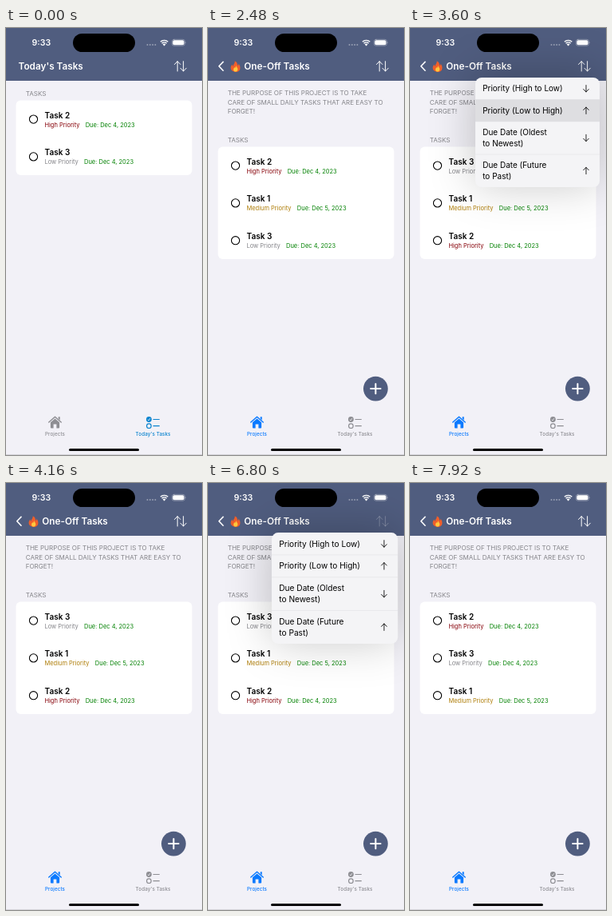
Write an HTML page that moves like this. It is 246 by 534 pixels and loops after 8 s.

```html
<!DOCTYPE html>
<html lang="en">
<head>
<meta charset="utf-8">
<title>Task list sorting</title>
<style>
  html, body { margin: 0; width: 100%; height: 100%; overflow: hidden; background: #f2f1f7; }
  svg { display: block; width: 100%; height: 100%; font-family: Inter, Roboto, sans-serif; }
  .line { fill: none; stroke: currentColor; stroke-linecap: round; stroke-linejoin: round; }
  .title { font-size: 11.75px; font-weight: 600; fill: #fff; }
  .head { font-size: 8.05px; fill: #85858a; }
  .task { font-size: 10px; font-weight: 600; }
  .sub { font-size: 7.5px; }
  .tab { font-size: 6.25px; font-weight: 500; letter-spacing: .1px; text-anchor: middle; fill: currentColor; }
  .item { font-size: 10px; }
  #panel { filter: drop-shadow(0 -4px 28px rgba(0, 0, 0, .23)); }
</style>
</head>
<body>
<svg viewBox="0 0 246 534">
  <rect width="246" height="534" fill="#f2f1f7"/>
  <rect width="246" height="66" fill="#505d7f"/>

  <!-- status bar -->
  <rect x="84" y="7" width="78" height="23" rx="11.5"/>
  <text x="32.6" y="22.4" font-size="10.6" font-weight="600" fill="#fff">9:33</text>
  <g fill="#fff">
    <g opacity=".4">
      <circle cx="177.5" cy="21" r="1"/><circle cx="180.8" cy="21" r="1"/>
      <circle cx="184.1" cy="21" r="1"/><circle cx="187.4" cy="21" r="1"/>
    </g>
    <path d="M198.6 22.4l-1.9-2a2.7 2.7 0 0 1 3.8 0z"/>
    <rect x="209.3" y="15.3" width="14.2" height="5.9" rx="1.8"/>
    <path d="M225.4 16.9q1.2 1.3 0 2.7z" opacity=".5"/>
  </g>
  <g class="line" color="#fff">
    <path d="M193.9 17.3a6.7 6.7 0 0 1 9.4 0M195.6 19.2a4.3 4.3 0 0 1 6 0" stroke-width="1.4" stroke-linecap="butt"/>
    <rect x="208.3" y="14.3" width="16.2" height="7.9" rx="2.6" stroke-width=".6" opacity=".5"/>
    <path id="sort" d="M215.2 54V41.7m-3.7 3.8l3.7-3.8 3.7 3.8M222.6 41.7V54m-3.7-3.8l3.7 3.8 3.7-3.8" stroke-width="1"/>
  </g>

  <g id="today">
    <text class="title" x="15.6" y="52">Today's Tasks</text>
    <text class="head" x="24.7" y="85">TASKS</text>
  </g>

  <g id="project">
    <path class="line" color="#fff" d="M19 42.4l-5.2 5.4 5.2 5.4" stroke-width="1.6"/>
    <path d="M33.6 41.2c3.4 1.6 3.3 4.2 3.8 5.8 1-.6 1-1.6 1-2.6 3.3 4.2 2.9 10.2-3.3 10.5-6.7.3-8.2-5.7-4.7-9.3q.1 1.7 1.1 2.3c.1-2.6 2.7-3.9 2.1-6.7z" fill="#f05f2b"/>
    <path d="M35 46.8c.3 2 2.6 3 2.3 5.4-.6 3.3-5.4 3-5.3-.2.1-1.5 1-1.8 1.2-2.9l.9.9q1-1.2.9-3.2z" fill="#ffc83d"/>
    <text class="title" x="45.3" y="52">One-Off Tasks</text>
    <g class="head">
      <text x="24.7" y="84.4">THE PURPOSE OF THIS PROJECT IS TO TAKE</text>
      <text x="24.7" y="95.7">CARE OF SMALL DAILY TASKS THAT ARE EASY TO</text>
      <text x="24.7" y="106.9">FORGET!</text>
      <text x="24.7" y="142.6">TASKS</text>
    </g>
    <circle cx="210.4" cy="451.1" r="15.4" fill="#505d7f"/>
    <path class="line" color="#fff" d="M204.2 451.1h12.4M210.4 444.9v12.4" stroke-width="2"/>
  </g>

  <!-- tab bar -->
  <g id="homeTab">
    <path class="line" d="M53.8 493l7.7-6.7 7.7 6.7" stroke-width="1.5"/>
    <path d="M65.7 486.2h2v4.2l-2-1.8zM55.9 493.3l5.6-4.9 5.6 4.9v6.3q0 1-1 1h-2.7v-5.1h-3.8v5.1h-2.7q-1 0-1-1z" fill="currentColor"/>
    <text class="tab" x="61.5" y="510">Projects</text>
  </g>
  <g id="todayTab">
    <circle cx="179.4" cy="489.5" r="3.4" fill="currentColor"/>
    <path d="M177.9 489.7l1.1 1.3 1.9-2.9" fill="none" stroke="#f2f1f7" stroke-width=".8"/>
    <g class="line" stroke-width="1.2">
      <circle cx="179.4" cy="497.7" r="2.8"/>
      <path d="M185 489.5h7.3M185 497.7h7.3"/>
    </g>
    <text class="tab" x="184.6" y="510">Today's Tasks</text>
  </g>
  <rect x="79" y="525.9" width="88" height="3.1" rx="1.55"/>
  <rect y="533.3" width="246" height=".7" fill="#c9c9ce"/>

  <g id="menu">
    <rect id="panel" x="82" y="62" width="156" height="137" rx="8" fill="#f4f4f6"/>
    <rect id="mark" x="82" width="156" fill="#dedee1"/>
  </g>
</svg>
<script>
const $ = id => document.getElementById(id);
const LOOP = 8000, MENU_X = 222, MENU_Y = 62;

const tasks = {
  1: ["Medium", "#ae7d08", 5],
  2: ["High", "#860008", 4],
  3: ["Low", "#85858a", 4]
};

function card(parent, top, order) {
  const rows = order.map((id, i) => {
    const [level, color, day] = tasks[id], y = top + i * 46.8;
    return `<circle cx="34.5" cy="${y + 23.6}" r="5.1" fill="none" stroke="#000" stroke-width="1.1"/>
      <text class="task" x="48.6" y="${y + 22}">Task ${id}</text>
      <text class="sub" x="48.4" y="${y + 33.1}" fill="${color}">${level} Priority<tspan dx="7.2" fill="#008000">Due: Dec ${day}, 2023</tspan></text>`;
  });
  parent.insertAdjacentHTML("beforeend",
    `<g><rect x="12.5" y="${top}" width="221" height="${order.length * 46.8}" rx="6" fill="#fff"/>${rows.join("")}</g>`);
  return parent.lastElementChild;
}

card($("today"), 90.5, [2, 3]);
const lists = [[2, 1, 3], [3, 1, 2], [2, 3, 1]].map(order => card($("project"), 148.5, order));

// Menu rows: top, height, arrow direction, lines
const items = [
  [62, 27.5, 1, "Priority (High to Low)"],
  [89.5, 27.5, -1, "Priority (Low to High)"],
  [117, 41, 1, "Due Date (Oldest", "to Newest)"],
  [158, 41, -1, "Due Date (Future", "to Past)"]
];
items.forEach(([top, height, dir, ...lines], i) => {
  const mid = top + height / 2;
  const text = lines.map((s, n) =>
    `<text class="item" x="91.2" y="${mid + 3.6 + (n - (lines.length - 1) / 2) * 13.4}">${s}</text>`);
  const rule = i ? `<path d="M82 ${top}h156" stroke="#dcdce0" stroke-width=".5"/>` : "";
  $("menu").insertAdjacentHTML("beforeend", rule + text.join("") +
    `<path class="line" d="M221 ${mid - 4.2 * dir}v${8.4 * dir}m-3.3 ${-3.4 * dir}l3.3 ${3.4 * dir} 3.3 ${-3.4 * dir}" stroke-width=".85"/>`);
});

// One visit to the menu: opening, choice, start of closing, chosen row
const visits = [
  { open: 2500, pick: 3600, close: 3985, row: 1 },
  { open: 6500, pick: 7440, close: 7670, row: 2 }
];
const CLOSING = 170;

function spring(ms) {
  const s = ms / 1000, w = 10.5, a = 13.6;
  return 1 - Math.exp(-a * s) * (Math.cos(w * s) + a / w * Math.sin(w * s));
}

const show = (el, on) => el.setAttribute("visibility", on ? "inherit" : "hidden");

function drawMenu(t) {
  const v = visits.find(v => t >= v.open && t < v.close + CLOSING);
  $("menu").style.display = v ? "" : "none";
  $("sort").setAttribute("opacity", v && t < v.pick ? .25 : 1);
  if (!v) return;
  const out = Math.max(0, (t - v.close) / CLOSING);
  const scale = (.15 + .85 * spring(t - v.open)) * (1 - .7 * out * out);
  const alpha = Math.min(1, (t - v.open) / 130) * (1 - out);
  $("menu").setAttribute("transform",
    `translate(${MENU_X} ${MENU_Y}) scale(${scale}) translate(${-MENU_X} ${-MENU_Y})`);
  $("menu").setAttribute("opacity", alpha);
  const [top, height] = items[v.row];
  $("mark").setAttribute("y", top);
  $("mark").setAttribute("height", height);
  show($("mark"), t >= v.pick);
}

function draw(t) {
  const inProject = t >= 800;
  show($("today"), !inProject);
  show($("project"), inProject);
  $("homeTab").style.color = inProject ? "#0a7aff" : "#8e8e93";
  $("todayTab").style.color = inProject ? "#8e8e93" : "#0b84cf";
  const sorted = visits.filter(v => t >= v.pick).length;
  lists.forEach((list, i) => show(list, i === sorted));
  drawMenu(t);
}

const start = performance.now();
function tick() {
  draw((performance.now() - start) % LOOP);
  requestAnimationFrame(tick);
}
tick();
</script>
</body>
</html>
```
